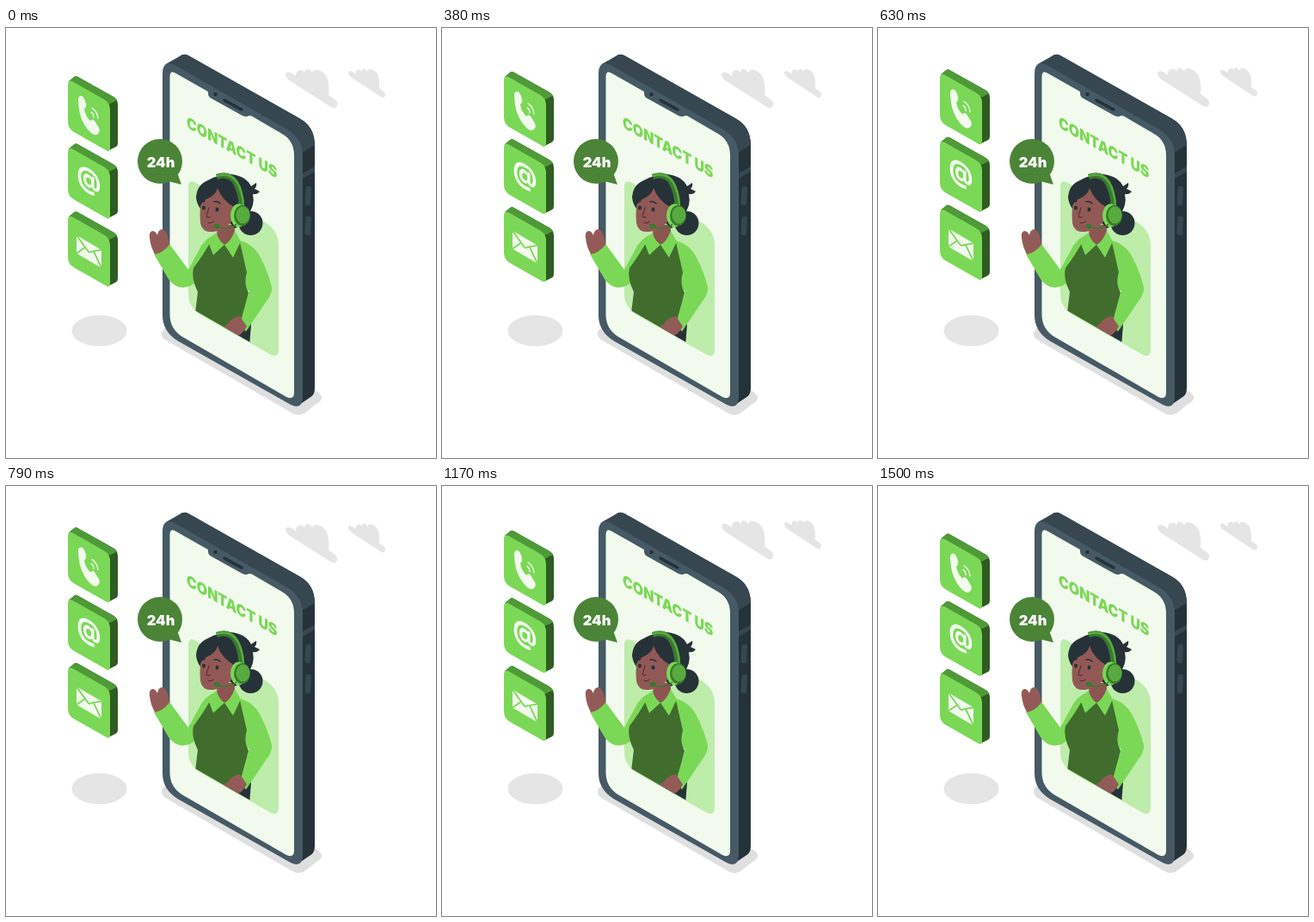
Recreate the animation shown at these times as an HTML page. Size 500 px wide and 500 px high, loop 1.54 s.

```html
<!DOCTYPE html>
<html lang="en">
<head>
<meta charset="utf-8">
<title>Contact us</title>
<style>
  html, body { margin: 0; width: 100%; height: 100%; overflow: hidden; background: #fff; }
  svg { display: block; width: 100%; height: 100%; }
  text { font-family: Inter, "Open Sans", sans-serif; font-weight: 900; }
</style>
</head>
<body>
<svg viewBox="0 0 500 500">
  <defs>
    <g id="tile">
      <path fill="#2f5c21" d="M118 143L128 138Q130 137 130 134V89Q130 83 125 80L84 57Q81 55 79 57L73 62Z"/>
      <path fill="#4f9a38" d="M73 62L79 57Q81 55 84 57L125 80Q128 82 129 84L119 89L95 82Z"/>
      <path fill="#7bd856" d="M72 66Q72 60 77 62L114 83Q121 87 121 95V139Q121 145 116 142L79 121Q72 117 72 109Z"/>
    </g>
    <path id="cloud" fill="#e5e5e5" d="M325 54Q326 49 333 53L337 56Q337 49 342 49Q345 48 347 52Q348 47 352 48Q355 50 356 52Q358 47 364 49Q374 53 375 65Q376 72 375 78L382 83Q386 86 385 90Q383 95 378 92L331 62Q326 59 325 54Z"/>
    <clipPath id="cardEdge"><path d="M150 150H330V392L212 324L150 324Z"/></clipPath>
  </defs>

  <g id="clouds">
    <use href="#cloud"/>
    <use href="#cloud" transform="translate(164.500 12) scale(.718 .74)"/>
  </g>
  <ellipse cx="108.500" cy="352" rx="32" ry="18" fill="#e5e5e5"/>
  <path fill="#e0dfdf" d="M181 356Q181 350 190 346L358 421Q367 425 367 430Q367 434 361 437L347 448Q340 452 333 448L186 363Q181 360 181 356Z"/>

  <g id="phone">
    <path fill="#263238" d="M186 42L202 33Q207 29 213 32.500L342 105.500Q359 115 359 136V419Q359 427 353 430L341 438L320 410Z"/>
    <path fill="#37474f" d="M185 43L202 33Q207 29 213 32.500L342 105.500Q358 115 359 136L344 145L320 120Z"/>
    <path fill="#37474f" d="M345 169L359 161V167L345 175Z"/>
    <rect x="348" y="184" width="6.500" height="22" rx="3" fill="#37474f" transform="rotate(3 351 195)"/>
    <rect x="348" y="219" width="6.500" height="22" rx="3" fill="#37474f" transform="rotate(3 351 230)"/>
    <path fill="#455a64" d="M182 53Q182 37 196 43L327 118Q345 129 345 148V428Q345 445 331 438L200 364Q182 353 182 334Z"/>
    <path fill="#f2faee" d="M190.500 57Q190.500 48 198 53L235 74V76Q235 80 239 82L275 102Q280 104 282 102L285 102L321 123Q335 131 335 148V424Q335 433 326 429L205 359Q190.500 350 190.500 333Z"/>
    <path stroke="#263238" stroke-width="3.500" stroke-linecap="round" d="M254 84L274 95"/>
    <circle cx="243.500" cy="77" r="2.300" fill="#263238"/>
  </g>

  <text transform="matrix(.866 .49 0 1 210 115.500)" font-size="18.300" fill="#7bd856">CONTACT US</text>
  <path fill="#beecab" d="M212 185Q212 175 221 180L300 225Q317 235 317 253V374Q317 384 308 380L227 334Q212 325 212 309Z"/>

  <g id="agent" clip-path="url(#cardEdge)">
    <path fill="#263238" d="M262 338L280 330L285 345L283 370L258 356Z"/>
    <path fill="#7bd856" d="M243 240Q230 245 224 259L212 281L190 251L172 263L189 292Q199 306 214 300L245 280Z"/>
    <path fill="#935b57" d="M173 263Q168 254 167 244Q166 237 170 236Q174 236 176 241Q177 234 182 234Q187 236 188 243Q190 247 190 252Q182 262 173 263Z"/>
    <path fill="#7bd856" d="M266 246Q287 249 296 267Q304 282 309 301Q310 309 302 319L279 353L266 336Q280 320 283 306L268 295Z"/>
    <path fill="#406d2d" d="M239 246Q231 262 218 279Q215 291 223 307L219 340L262 352Q272 344 274 337L282 308Q276 297 280 284L272 249Z"/>
    <path fill="#935b57" d="M280 347L272 335Q262 337 258 344Q252 347 254 351L262 351L254 354Q254 360 263 360Q274 359 280 347Z"/>
    <path fill="#8d5551" d="M246 231L266 228V241Q260 251 251 252L245 241Z"/>
    <path fill="#7bd856" d="M245 238L234 246L241 264L254 252L264 267L273 248L266 236Q261 249 254 252Q246 246 245 238Z"/>
    <circle cx="284.500" cy="227" r="14" fill="#263238"/>
    <path fill="#263238" d="M221 197Q222 182 235 177Q247 170 262 170Q279 172 285 184L291 180Q292 184 289 187L295 190Q292 194 287 193Q290 207 281 217L267 233L241 210L226 210Q222 205 221 197Z"/>
    <path fill="#915955" d="M226 207Q228 201 235 198Q244 194 246 186Q251 200 265 208L263 224Q253 238 238 237Q228 237 226 227Q225 217 226 207Z"/>
    <path fill="none" stroke="#263238" stroke-width="1.500" stroke-linecap="round" d="M227 203L231 201M242 202Q246 201 249 204"/>
    <ellipse cx="230" cy="209" rx="2" ry="2.500" fill="#263238"/>
    <ellipse cx="245.500" cy="211" rx="2" ry="2.500" fill="#263238"/>
    <path fill="none" stroke="#653532" stroke-width="1.400" stroke-linecap="round" d="M236 209L233 219Q235 221 237 220M235 226Q238 228 241 225"/>
    <path fill="none" stroke="#397a2e" stroke-width="6.500" d="M245 173Q260 168 267 180Q273 190 274 207"/>
    <path fill="none" stroke="#58ab3e" stroke-width="2.500" d="M245 172Q261 167 269 180Q275 190 276 207"/>
    <ellipse cx="270.500" cy="218" rx="9.500" ry="13.500" fill="#7bd856"/>
    <ellipse cx="274.500" cy="218" rx="9.500" ry="12" fill="#397a2e"/>
    <ellipse cx="275.500" cy="217.500" rx="8" ry="10" fill="#58ab3e"/>
    <path fill="none" stroke="#397a2e" stroke-width="1.500" d="M268 228Q261 235 246 232"/>
    <ellipse cx="245" cy="230.500" rx="3.500" ry="2.800" fill="#397a2e"/>
  </g>

  <path fill="#4b8437" d="M188 178L204 182L199 168Z"/>
  <circle cx="179" cy="155" r="26" fill="#4b8437"/>
  <text x="180" y="161.500" font-size="16.500" text-anchor="middle" fill="#fff">24h</text>

  <g id="tiles">
    <use href="#tile"/>
    <path fill="#f2faee" d="M84 83Q84 79 88 79Q91 80 93 88Q94 92 91 94Q92 102 98 108Q101 105 103 108L108 116Q110 120 107 123Q104 126 99 122Q90 114 86 100Q84 91 84 83Z"/>
    <path fill="none" stroke="#f2faee" stroke-width="1.300" stroke-linecap="round" d="M99 98Q102 99 102 104M100 93Q106 97 107 105"/>
    <use href="#tile" y="78.500"/>
    <text transform="matrix(.866 .5 0 1 96.500 186)" font-size="31" style="font-weight:800" text-anchor="middle" fill="#f2faee">@</text>
    <use href="#tile" y="157.500"/>
    <path fill="#f2faee" d="M82 241L111 258V279L82 262Z"/>
    <path fill="none" stroke="#7bd856" stroke-width="1.800" d="M82 241L95 259Q97 262 99 260L111 258M82 262L92 255M111 279L102 260"/>
  </g>
</svg>
<script>
  const LOOP = 1540, PEAK = 700, RISE = 8.1, CLOUD_DELAY = 540;
  const byId = id => document.getElementById(id);

  // Rise slows towards the peak, then the fall gathers speed.
  function float(node, t) {
    const away = t < PEAK ? 1 - t / PEAK : (t - PEAK) / (LOOP - PEAK);
    const y = -RISE * (1 - away ** 1.3);
    node.setAttribute('transform', `translate(0 ${y.toFixed(2)})`);
  }

  // The clouds rest first, so they snap back when the loop restarts.
  function draw() {
    const t = performance.now() % LOOP;
    float(byId('tiles'), t);
    float(byId('clouds'), Math.max(0, t - CLOUD_DELAY));
    requestAnimationFrame(draw);
  }
  draw();
</script>
</body>
</html>
```
